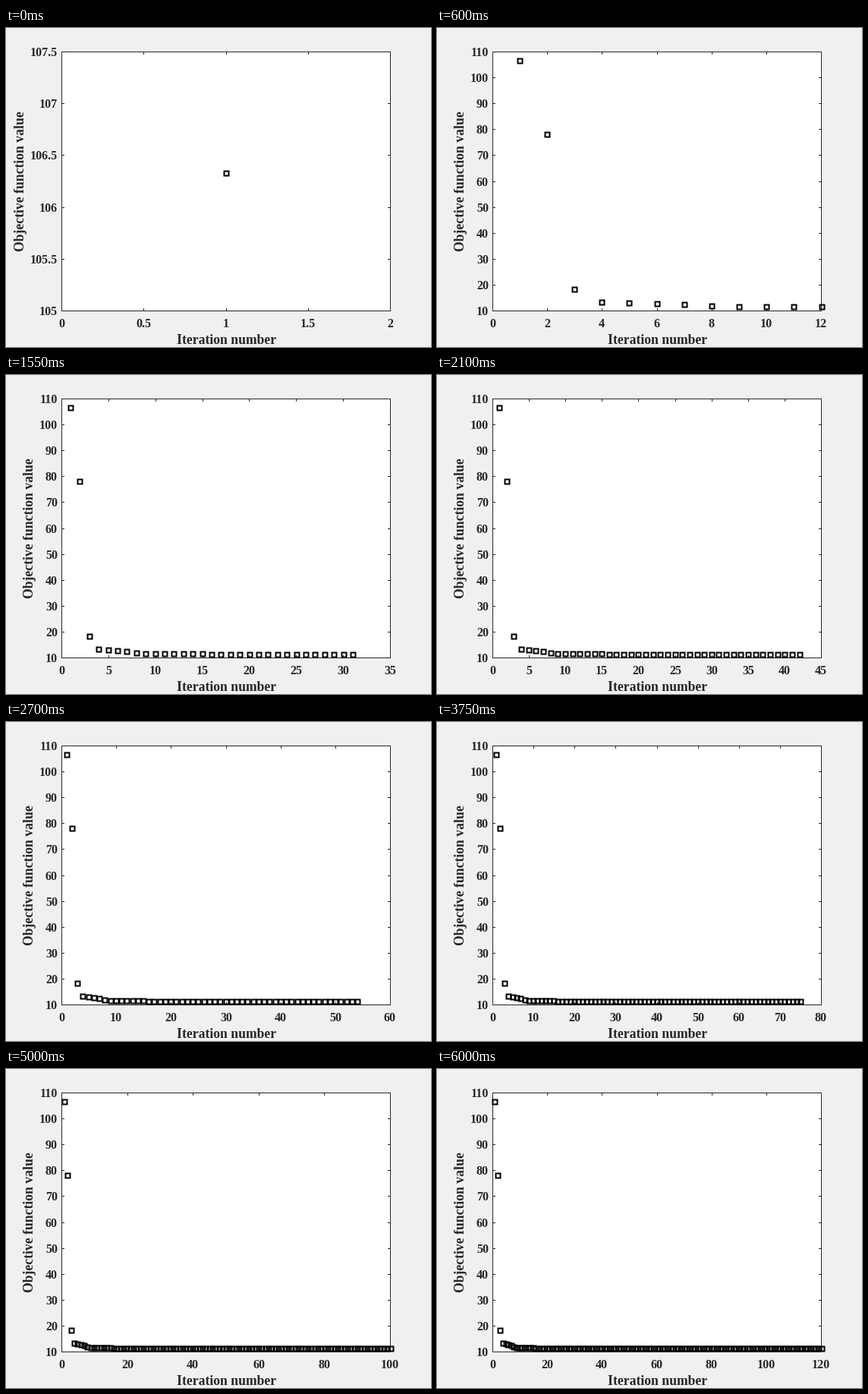
A matplotlib script that plays this animation: 560 by 420 pixels, repeating every 6.05 s.

```python
import math

import matplotlib.pyplot as plt
from matplotlib.animation import FuncAnimation
from matplotlib.collections import LineCollection, PolyCollection
from matplotlib.patches import Rectangle

W, H, DPI = 560, 420, 80
PX = 72 / DPI                                # points per pixel
LEFT, RIGHT, TOP, BOTTOM = 73.5, 506.5, 31.5, 372.5
TICK = 3.5
INK = "#262626"
STEPS = 120

# Objective value per iteration: fast drop, then two plateaus.
values = [106.33, 78.0, 18.4, 13.4, 13.2, 12.9, 12.6, 12.0]
values += [11.7] * 7
values += [11.4] * (STEPS - len(values))

plt.rcParams["font.family"] = "Liberation Serif"
plt.rcParams["font.weight"] = "bold"

fig = plt.figure(figsize=(W / DPI, H / DPI), dpi=DPI, facecolor="#f0f0f0")
ax = fig.add_axes([0, 0, 1, 1])
ax.set_xlim(0, W)
ax.set_ylim(H, 0)
ax.axis("off")

ax.add_patch(Rectangle((LEFT, TOP), RIGHT - LEFT, BOTTOM - TOP, fc="white",
                       ec=INK, lw=PX, joinstyle="miter", snap=False))
ticks = LineCollection([], colors=INK, linewidths=PX, snap=False, zorder=2)
squares = PolyCollection([], facecolors="none", edgecolors="black",
                         linewidths=2 * PX, joinstyle="miter", snap=False,
                         zorder=3)
ax.add_collection(ticks, autolim=False)
ax.add_collection(squares, autolim=False)

label = dict(fontsize=17.6 * PX, color=INK, ha="center", va="baseline")
ax.text(290.7, 416, "Iteration number", **label)
ylabel = ax.text(36, 201.5, "Objective function value", rotation=90,
                 rotation_mode="anchor", **label)
tick_texts = []


def nice_axis(lo, hi, max_ticks):
    """Tightest round limits, with as many ticks as allowed."""
    best = None
    for e in range(-2, 3):
        for m in (1, 2, 5):
            step = m * 10.0 ** e
            a = math.floor(lo / step + 1e-9)
            b = math.ceil(hi / step - 1e-9)
            if b - a < max_ticks:
                cand = (round((b - a) * step, 6), step, a, b)
                best = min(best, cand) if best else cand
    _, step, a, b = best
    return [i * step for i in range(a, b + 1)]


def pixel(v):
    return math.floor(v + 1e-6) + 0.5


def square(x, y, r=3):
    return [(x - r, y - r), (x + r, y - r), (x + r, y + r), (x - r, y + r)]


def add_tick_text(x, y, v, ha):
    tick_texts.append(ax.text(x, y, f"{v:g}", fontsize=16 * PX, color=INK,
                              ha=ha, va="baseline"))


def update(k):
    n = max(1, k)
    data = values[:n]
    if n == 1:
        xs = nice_axis(0, 2, 10)
        ys = nice_axis(data[0] - 1, data[0] + 1, 11)
    else:
        xs = nice_axis(1, n, 10)
        ys = nice_axis(min(data), max(data), 11)

    def frac(v, axis):
        return (v - axis[0]) / (axis[-1] - axis[0])

    while tick_texts:
        tick_texts.pop().remove()
    segs = []
    for v in xs:
        x = pixel(LEFT + frac(v, xs) * (RIGHT - LEFT))
        segs += [[(x, BOTTOM), (x, BOTTOM - TICK)], [(x, TOP), (x, TOP + TICK)]]
        add_tick_text(x - 0.5, 394, v, "center")
    for v in ys:
        y = pixel(BOTTOM - frac(v, ys) * (BOTTOM - TOP))
        segs += [[(LEFT, y), (LEFT + TICK, y)], [(RIGHT, y), (RIGHT - TICK, y)]]
        add_tick_text(68, y + 5.5, v, "right")
    ticks.set_segments(segs)

    squares.set_verts([
        square(pixel(73 + 434 * frac(i, xs)), pixel(373.3 - 342 * frac(v, ys)))
        for i, v in enumerate(data, 1)])

    # The axis title keeps clear of the wider decimal labels.
    ylabel.set_x(24 if n == 1 else 36)
    return [ticks, squares, ylabel, *tick_texts]


anim = FuncAnimation(fig, update, frames=STEPS + 1, interval=50, repeat=True,
                     blit=False)
plt.show()
```
